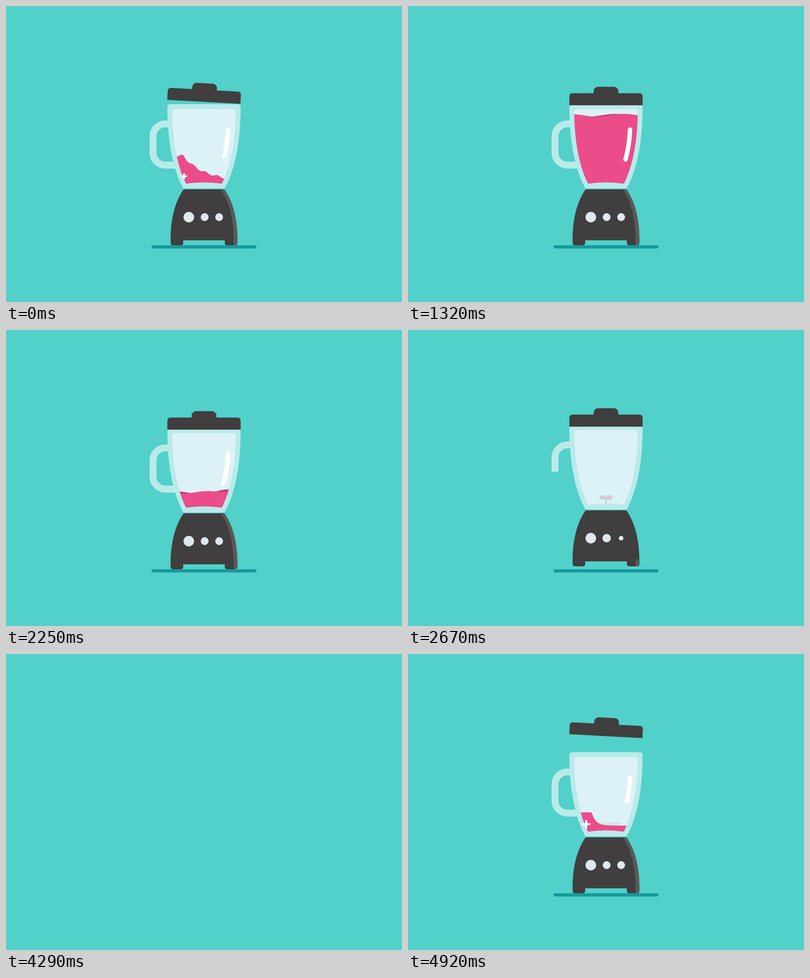
Write an HTML page with a canvas that moves like this. It is 800 by 600 pixels and loops after 4950 ms.

```html
<!DOCTYPE html>
<html lang="en">
<head>
<meta charset="utf-8">
<title>Blender</title>
<style>
html, body { margin: 0; width: 100%; height: 100%; overflow: hidden; background: #52d0ca; }
canvas { display: block; }
</style>
</head>
<body>
<canvas id="stage" width="800" height="600"></canvas>
<script>
const ctx = document.getElementById('stage').getContext('2d');
const LOOP = 4950, STEP = 30, CENTER = 400, PIVOT = 341, FLOOR = 485;
const COLOR = {
  bg: '#52d0ca', glass: '#b9eaea', inner: '#dcf2f7', dark: '#403e3f', shade: '#5b595a',
  button: '#dfe8ec', line: '#159a9c', pink: '#eb4c8a', deep: '#c93974', blade: '#cbcfd6'
};

const mix = (a, b, u) => a + (b - a) * u;
const ramp = (t, from, to) => Math.min(1, Math.max(0, (t - from) / (to - from)));
const smooth = u => u * u * (3 - 2 * u);
const easeOut = u => 1 - (1 - u) ** 2;
const backOut = (u, c = 1.7) => 1 + (c + 1) * (u - 1) ** 3 + c * (u - 1) ** 2;
const cycle = (x, length) => Math.cos(2 * Math.PI * x / length);

// A tapering glass, symmetric about the center line.
function cup(top, bottom, rim, foot, radius, dip) {
  const path = new Path2D();
  const upper = mix(top, bottom, 0.41), lower = mix(top, bottom, 0.768);
  const left = CENTER - rim, right = CENTER + rim;
  path.moveTo(CENTER, top);
  path.arcTo(right, top, right, top + radius, radius);
  path.bezierCurveTo(right, upper, right - 10, lower, CENTER + foot, bottom);
  path.quadraticCurveTo(CENTER, bottom - dip, CENTER - foot, bottom);
  path.bezierCurveTo(left + 10, lower, left, upper, left, top + radius);
  path.arcTo(left, top, CENTER, top, radius);
  path.closePath();
  return path;
}

function lidShape() {
  const path = new Path2D();
  path.roundRect(326, 177.5, 148, 24.5, [6, 6, 0, 0]);
  path.roundRect(375, 164.5, 50, 20, [9, 9, 0, 0]);
  return path;
}

const jug = cup(199, 370, 74, 41.5, 6, 0);
const inner = cup(209, 360, 64, 36, 5, 5.5);
const lid = lidShape();
const handle = new Path2D('M329 239H322A25 25 0 0 0 297 264V297.500A25 25 0 0 0 322 322.500H346');
const base = new Path2D('M359 371.500H441C458 395 467 430 467.500 470V480Q467.500 485 462.500 485H447Q442 485 442 480V475H358V480Q358 485 353 485H337.500Q332.500 485 332.500 480V470C333 430 342 395 359 371.500Z');
const shade = new Path2D('M433 371C452 395 460 435 460 475V486H475V371Z');
const sheen = new Path2D('M448.500 250.500Q447.500 281 439.500 311');

function fill(shape, color) {
  ctx.fillStyle = color;
  ctx.fill(shape);
}

function scoped(draw, ...args) {
  ctx.save();
  draw(...args);
  ctx.restore();
}

function clipRect(x, y, w, h) {
  ctx.beginPath();
  ctx.rect(x, y, w, h);
  ctx.clip();
}

function rotateAt(x, y, degrees) {
  ctx.translate(x, y);
  ctx.rotate(degrees * Math.PI / 180);
  ctx.translate(-x, -y);
}

function scaleAt(x, y, s) {
  ctx.translate(x, y);
  ctx.scale(s, s);
  ctx.translate(-x, -y);
}

// First gush: a crest on the left that decays towards the right.
function pile(x, t) {
  const grow = ramp(t, -30, 0);
  const crest = mix(371, 358, grow), reach = mix(8, 42, grow);
  const height = mix(27, 51, grow) * Math.exp(-Math.max(0, x - crest) / reach);
  const bumps = 2.2 * grow * cycle(x - 391, 24);
  return mix(363, mix(348, 355, grow) - height + bumps, ramp(t, -120, -30));
}

// Full jug: a travelling wave, then a swell on the right while it drains.
function wave(x, t, crest, direction, swellFrom, swellTo) {
  const drain = ramp(t, 1640, 2340);
  const swell = 20 * smooth(ramp(t, 1640, 1830)) * (1 - drain) / 0.73;
  return 221.5 + 142 * drain ** 2
    - 2.8 * cycle(x - crest - direction * 110 * (t - 810) / 340, 110)
    - swell * smooth(ramp(x, swellFrom, swellTo));
}

function surface(x, t, isBack) {
  const filled = ramp(t, 0, 480);
  const chop = 6 * Math.sin(Math.PI * filled) * Math.sin(x / 17 - t / 65);
  const full = isBack ? wave(x, t, 364, -1, 395, 455) : wave(x, t, 382, 1, 416, 460);
  return mix(pile(x, t), full, smooth(filled)) + (isBack ? -chop : chop);
}

function drawLiquid(t, isBack) {
  if (t < -120 || t >= 2340) return;
  ctx.beginPath();
  ctx.moveTo(330, 365);
  for (let x = 330; x <= 470; x += 2) ctx.lineTo(x, surface(x, t, isBack));
  ctx.lineTo(470, 365);
  ctx.fillStyle = isBack ? COLOR.deep : COLOR.pink;
  ctx.fill();
}

function drawBlade(t) {
  if (t < -90) return;
  const reach = 32 * Math.abs(cycle(t + 30, 265.2));
  const lobe = Math.max(2, reach / 2);
  ctx.globalAlpha = ramp(t, -100, 60) * (1 - ramp(t, 2700, 2850));
  ctx.beginPath();
  for (const side of [-1, 1]) ctx.ellipse(CENTER + side * (reach - lobe), 345.5, lobe, 4.7, 0, 0, 7);
  ctx.rect(398.3, 345, 3.6, 14);
  ctx.fillStyle = COLOR.blade;
  ctx.fill();
  ctx.globalAlpha = 1;
}

function drawSheen(t) {
  const shown = easeOut(ramp(t, -180, 90)) * (1 - ramp(t, 2400, 2600));
  if (!shown) return;
  clipRect(430, 245, 30, 1 + 70 * shown);
  ctx.strokeStyle = '#fff';
  ctx.lineWidth = 9;
  ctx.lineCap = 'round';
  ctx.stroke(sheen);
}

function drawHandle(t) {
  const shown = ramp(t, -480, -60) * (1 - ramp(t, 2580, 2768));
  if (!shown) return;
  ctx.strokeStyle = COLOR.glass;
  ctx.lineWidth = 14;
  ctx.setLineDash([144 * shown, 400]);
  ctx.stroke(handle);
}

function drawContents(t) {
  scaleAt(CENTER, 284, easeOut(ramp(t, -600, -350)));
  fill(inner, COLOR.inner);
  ctx.clip(inner);
  drawBlade(t);
  drawLiquid(t, true);
  drawLiquid(t, false);
}

function drawJug(t) {
  scoped(drawHandle, t);
  fill(jug, COLOR.glass);
  scoped(drawContents, t);
  scoped(drawSheen, t);
}

function drawShade(t) {
  const shown = ramp(t, -270, -30) * (1 - ramp(t, 2495, 2695));
  clipRect(280, mix(FLOOR, 371, shown), 240, 400);
  ctx.clip(base);
  fill(shade, COLOR.shade);
}

function drawButton(i, t) {
  const pop = start => backOut(ramp(t, start, start + 210), 2.6);
  const leave = 2769 - 141 * i;
  const size = pop(-540 + 105 * i) * backOut(1 - ramp(t, leave, leave + 210), 2.6);
  const x = i ? 372 + 29.3 * i : 369.3;
  ctx.beginPath();
  ctx.arc(x, 428, Math.max(0, (i ? 7.9 : 10.7) * size), 0, 7);
  ctx.fillStyle = COLOR.button;
  ctx.fill();
}

function drawBase(t) {
  fill(base, COLOR.dark);
  scoped(drawShade, t);
  for (let i = 0; i < 3; i++) drawButton(i, t);
}

function drawLid(t) {
  if (t < -150) return;
  const fall = 105 * (ramp(t, -150, 8) ** 1.5 - 1);
  const running = ramp(t, 60, 120) * (1 - ramp(t, 2340, 2450));
  ctx.translate(0, fall - running * (0.4 + 0.4 * Math.sin((t - 810) / 23 - 1.57)));
  rotateAt(399, 195, 3.1 * (1 - ramp(t, 0, 60)));
  fill(lid, COLOR.dark);
}

function drawBlender(t) {
  const enter = ramp(t, -660, -210);
  const leave = ramp(t, 2730, 3330);
  const size = backOut(ramp(t, -660, -440)) * (1 - smooth(leave));
  if (size <= 0.001) return;
  const lift = -7 * smooth(ramp(t, 2560, 2705)) * (1 - leave) - 3 * (1 - enter);
  const swing = -14 * (1 - enter) ** 2 * cycle(enter, 1.8);
  ctx.translate(0, lift);
  rotateAt(CENTER, FLOOR, swing);
  rotateAt(CENTER, PIVOT, 40 * leave ** 3);
  scaleAt(CENTER, PIVOT, size);
  drawJug(t);
  drawBase(t);
  scoped(drawLid, t);
}

function drawGround(t) {
  const half = 106 * smooth(ramp(t, -540, -250)) * (1 - smooth(ramp(t, 2760, 3150)));
  if (half < 0.5) return;
  ctx.beginPath();
  ctx.roundRect(CENTER - half, FLOOR, 2 * half, 6.5, Math.min(3.2, half / 30));
  ctx.fillStyle = COLOR.line;
  ctx.fill();
}

function drawSparkle(x, y, from, to, t) {
  const arm = 9 * Math.sin(Math.PI * ramp(t, from, to));
  if (arm < 0.3) return;
  const width = 1 + arm * 0.36, reach = arm - width / 2;
  ctx.beginPath();
  ctx.moveTo(x - reach, y);
  ctx.lineTo(x + reach, y);
  ctx.moveTo(x, y - reach);
  ctx.lineTo(x, y + reach);
  ctx.strokeStyle = '#fff';
  ctx.lineWidth = width;
  ctx.lineCap = 'round';
  ctx.stroke();
}

function render(now) {
  const clock = Math.floor((now % LOOP) / STEP) * STEP;
  // The entrance runs on negative time, so it flows straight into zero.
  const t = clock >= 4200 ? clock - LOOP : clock;
  ctx.fillStyle = COLOR.bg;
  ctx.fillRect(0, 0, 800, 600);
  drawGround(t);
  scoped(drawBlender, t);
  scoped(drawSparkle, 475, 219, -525, -315, t);
  scoped(drawSparkle, 360, 345, -105, 35, t);
}

const start = performance.now();
function tick() {
  render(performance.now() - start);
  requestAnimationFrame(tick);
}
tick();
</script>
</body>
</html>
```
